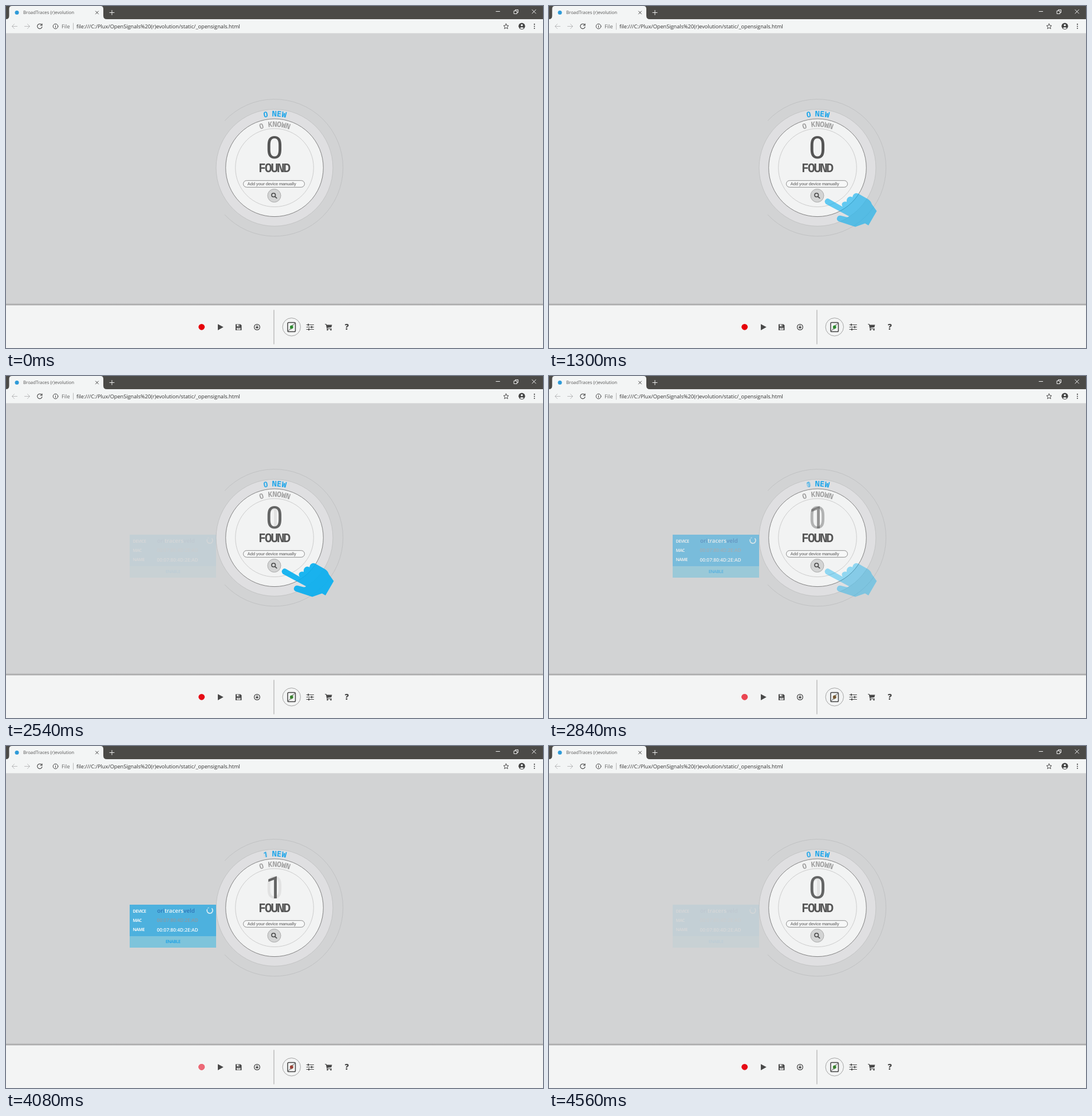
An HTML page that plays this animation: 938x597 px, repeating every 4620 ms.

```html
<!DOCTYPE html>
<html lang="en">
<head>
<meta charset="utf-8">
<title>Device search</title>
<style>
  html, body { margin: 0; width: 100%; height: 100%; overflow: hidden; background: #d2d3d4; }
  svg { display: block; width: 938px; height: 597px; text-rendering: geometricPrecision; }
  text { font-family: "Open Sans", "Noto Sans", sans-serif; }
  .mono { font-family: "Noto Sans Mono", "DejaVu Sans Mono", monospace; }
  .digit { font-family: Roboto, "Liberation Sans", sans-serif; }
  .hint { font-family: "Liberation Sans", sans-serif; }
  .mid { text-anchor: middle; }
  .line { fill: none; stroke-linecap: round; stroke-linejoin: round; }

  /* Cross-fades advance in tenths, one step every 60 ms */
  .hand, .found, .empty { animation: 4620ms steps(10, start) infinite; }
  .hand { animation-name: hand; }
  .found { animation-name: found; }
  .empty { animation-name: empty; }
  @keyframes hand {
    0%, 21.645% { opacity: 0; }
    34.632%, 54.978% { opacity: 1; }
    67.965%, 100% { opacity: 0; }
  }
  @keyframes found {
    0%, 54.978% { opacity: 0; }
    67.965% { opacity: 1; }
    88.3116% { opacity: 1; animation-timing-function: steps(9, start); }
    100% { opacity: .1; }
  }
  @keyframes empty {
    0%, 54.978% { opacity: 1; }
    67.965% { opacity: 0; }
    88.3116% { opacity: 0; animation-timing-function: steps(9, start); }
    100% { opacity: .9; }
  }
</style>
</head>
<body>
<svg viewBox="0 0 938 597">
  <defs>
    <linearGradient id="edge" x2="0" y2="1">
      <stop offset="0" stop-color="#d2d3d4"/>
      <stop offset="1" stop-color="#969696"/>
    </linearGradient>
    <path id="newArc" d="M379.500 282.300a89.500 89.500 0 0 1 179 0"/>
    <path id="knownArc" d="M397.500 282.300a71.500 71.500 0 0 1 143 0"/>
  </defs>
  <rect width="938" height="597" fill="#d2d3d4"/>

  <!-- Browser window -->
  <rect width="938" height="23" fill="#4b4a47"/>
  <path d="M0 23Q5.500 23 5.500 17V5Q5.500 0 10.500 0H165Q170 0 170 5V17Q170 23 176 23H938V48H0Z" fill="#f3f5f5"/>
  <path d="M0 47.500H938" stroke="#e2e3e3"/>
  <circle cx="19" cy="11.500" r="3.500" fill="#2f9bd8"/>
  <text x="30" y="14" font-size="7.850" fill="#555">BroadTraces (r)evolution</text>
  <g class="line" stroke="#444">
    <path d="M156.500 9l5 5m0-5l-5 5"/>
    <path d="M185 7.500v8m-4-4h8M856 9.500h6.500M919 6.500l6.500 6.500m0-6.500l-6.500 6.500" stroke="#eee"/>
    <path d="M887.500 8.500h5v5h-5zM889.500 8.500v-2h5v5h-2" stroke="#eee"/>
    <path d="M19.500 35.500h-9m4-4l-4 4 4 4M32.500 35.500h9m-4-4l4 4-4 4" stroke="#b9babb"/>
    <path d="M62 32.500a4.200 4.200 0 1 0 1 4M63 31v3h-3.200" stroke-width="1.100"/>
    <circle cx="86.500" cy="35.500" r="4.300"/>
    <path d="M86.500 35v2.500M86.500 33.200v.1"/>
    <path d="M873.500 31l1.300 3 3.200.3-2.400 2.200.7 3.200-2.800-1.700-2.800 1.700.7-3.200-2.400-2.200 3.200-.3z"/>
    <path d="M117.500 30v11" stroke="#bbb"/>
  </g>
  <text x="97" y="38.700" font-size="9.200" fill="#666">File</text>
  <text x="123" y="38.700" font-size="9.180" fill="#333">file:///C:/Plux/OpenSignals%20(r)evolution/static/_opensignals.html</text>
  <circle cx="901" cy="35.300" r="5.700" fill="#444"/>
  <circle cx="901" cy="33.500" r="1.800" fill="#f3f5f5"/>
  <path d="M897.500 38.500q3.500-3 7 0-3.500 3-7 0z" fill="#f3f5f5"/>
  <path d="M923 31.800v.1m0 3.500v.1m0 3.500v.1" class="line" stroke="#444" stroke-width="2"/>

  <!-- Search dial -->
  <g transform="translate(469 282.300)">
    <path d="M-87-82A119.600 119.600 0 1 1-87 82" fill="none" stroke="#bcbdbe" stroke-width=".8"/>
    <circle r="102" fill="#dfdfe1" stroke="#b9babb" stroke-width=".7"/>
    <circle r="85.300" fill="#f2f3f3" stroke="#777" stroke-width=".9"/>
    <circle r="68.300" fill="#f2f3f3" stroke="#bbb" stroke-width=".7"/>
  </g>
  <g class="mid" font-weight="600" font-size="13.500" fill="#1ba5ea">
    <text class="digit empty"><textPath href="#newArc" startOffset="44.700%">0</textPath></text>
    <text class="digit found"><textPath href="#newArc" startOffset="44.700%">1</textPath></text>
    <text class="mono"><textPath href="#newArc" startOffset="52.800%">NEW</textPath></text>
    <g font-size="13" fill="#a0a0a0">
      <text class="digit"><textPath href="#knownArc" startOffset="40.300%">0</textPath></text>
      <text class="mono" letter-spacing="-.4"><textPath href="#knownArc" startOffset="53.400%">KNOWN</textPath></text>
    </g>
  </g>
  <g class="mid" fill="#555">
    <g font-size="54">
      <text class="digit empty" x="469" y="265.500">0</text>
      <text class="digit found" x="469" y="265.500">1</text>
    </g>
    <text class="mono" x="468.200" y="290.300" font-size="21" font-weight="600" letter-spacing="-1.800">FOUND</text>
  </g>
  <rect x="414.500" y="304.700" width="107" height="11.600" rx="5.800" fill="#f7f8f8" stroke="#8a8a8a"/>
  <text class="hint" x="421.500" y="313.200" font-size="7.500" font-weight="700" letter-spacing="-.330" fill="#828282">Add your device manually</text>
  <circle cx="468.500" cy="331" r="11.500" fill="#d3d4d4" stroke="#aaa"/>
  <g class="line" stroke="#4a4a4a" stroke-width="1.600">
    <circle cx="467.300" cy="330" r="3.300"/>
    <path d="M470 332.800l2.800 2.600"/>
  </g>

  <!-- Bottom toolbar -->
  <rect y="518.500" width="938" height="4" fill="url(#edge)"/>
  <rect y="522.500" width="938" height="75" fill="#f3f4f4"/>
  <path d="M468 530.500V590.500" stroke="#a0a0a0"/>
  <circle cx="341.700" cy="560.300" r="5.400" fill="#e60009"/>
  <circle class="found" cx="341.700" cy="560.300" r="5.400" fill="#ed7584"/>
  <g fill="#484848">
    <path d="M370 555.300l9.800 5.300-9.800 5.300z"/>
    <path d="M401 555.500h8.500l2 2v8.500h-10.500z"/>
    <path d="M403 556.300h5v3h-5zM403 561.800h6.500v3.400h-6.500z" fill="#f3f4f4"/>
    <path d="M406 556.300h1.500v2.300h-1.500zM404 562.800h4.500v.7h-4.500z"/>
    <path d="M435.300 560h6.400l-3.200 3.500z"/>
    <path d="M559.500 556.500h10l-1.200 4.500-7.800 1z"/>
    <circle cx="561.500" cy="565.300" r="1.200"/>
    <circle cx="567.500" cy="565.300" r="1.200"/>
    <text class="mid" x="595.300" y="565.300" font-size="14" font-weight="800">?</text>
  </g>
  <g class="line" stroke="#484848" stroke-width="1.200">
    <circle cx="438.500" cy="560.500" r="4.900"/>
    <path d="M438.500 557.500v3"/>
    <path d="M525 556.500h12.500M525 560.500h12.500M525 564.500h12.500M557.500 555.500h1.800l1.700 8h7.500"/>
    <path d="M528 555.500v2m6 2v2m-5 2v2" stroke-width="2"/>
  </g>
  <circle cx="498.800" cy="560.300" r="15.700" fill="none" stroke="#999" stroke-width=".9"/>
  <rect x="492" y="552.500" width="13.500" height="16" rx="1.800" fill="none" stroke="#444" stroke-width="1.500"/>
  <path d="M504.500 553.500l-4.500 5.500M497.500 562l-4.500 5.500" stroke="#555"/>
  <circle cx="498.800" cy="560.500" r="2.900" fill="#28a92b"/>
  <circle class="found" cx="498.800" cy="560.500" r="2.900" fill="#d8363b"/>
  <path d="M500.500 556.500l-3.200 4.200h3l-3.200 4.200" class="line" stroke="#444" stroke-width=".8"/>

  <!-- Detected device -->
  <g class="found">
    <rect x="216" y="277" width="151" height="55" fill="#3faee0"/>
    <rect x="216" y="332" width="151" height="20" fill="#75c3dc"/>
    <g font-size="7.500" font-weight="700" letter-spacing="-.550" fill="#f4fafc">
      <text x="221.500" y="290.500">DEVICE</text>
      <text x="221.500" y="306.800">MAC</text>
      <text x="221.500" y="323.200">NAME</text>
      <text class="mid" x="291.500" y="344.300" fill="#16a0e6">ENABLE</text>
    </g>
    <text x="264" y="291" font-size="9.800" font-weight="600" fill="#1c69b3">ori<tspan fill="#f4fafc">tracers</tspan>veld</text>
    <g font-size="8.400" font-weight="600">
      <text x="263.500" y="307.300" fill="#84949e">00:07:80:4D:2E:AD</text>
      <text x="263.500" y="323.700" fill="#fff">00:07:80:4D:2E:AD</text>
    </g>
    <path d="M359.800 283.800a5 5 0 1 1-8.500 1.700" class="line" stroke="#dff1f8" stroke-width="1.700"/>
    <path d="M352.500 283.300l1.700-1.200" class="line" stroke="#a5d8ee" stroke-width="1.300"/>
  </g>

  <path class="hand" fill="#03aef0" d="M488.500 336.500L513 350.500C509 345 514 340 520 342C519 334 526 331 530 334C531 327 537 325 541 328L557 337Q562 340 564 346L572.500 358L558 383L552 379.500L535 385.500L506 376Q502 374 503 370Q505 365 510 366L520 368.500Q523 369 524 367L483.500 345.500Q480 341.500 483 338Q485.500 335 488.500 336.500Z"/>
</svg>
</body>
</html>
```
